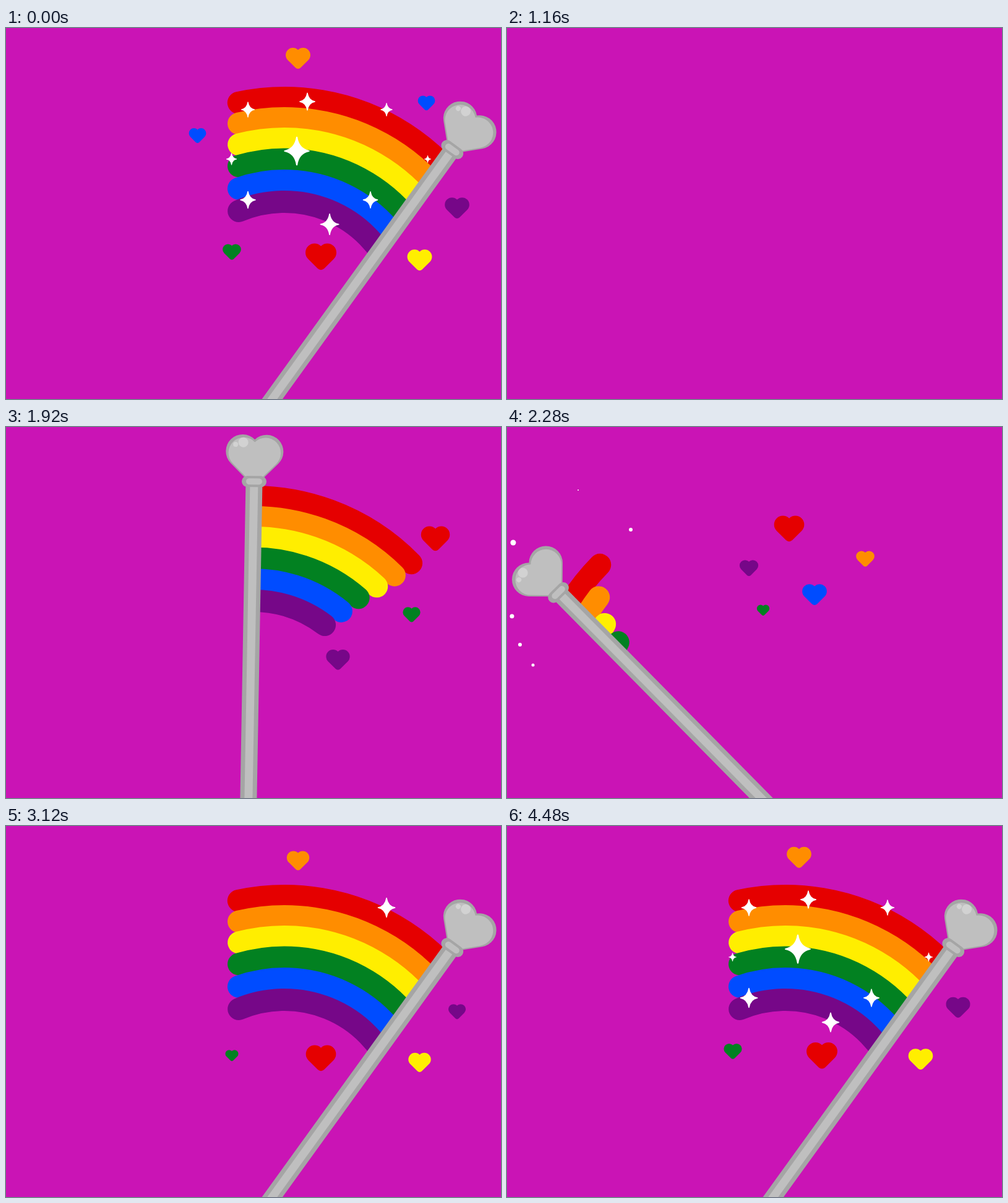
Recreate the animation shown at these times as an HTML page with a canvas. Size 800 by 600 pixels, loop 4520 ms.

```html
<!DOCTYPE html>
<html lang="en">
<head>
<meta charset="utf-8">
<title>Rainbow wand</title>
<style>
html, body { margin: 0; width: 100%; height: 100%; overflow: hidden; background: #ca14b5; }
canvas { display: block; width: 800px; height: 600px; }
</style>
</head>
<body>
<canvas id="stage" width="800" height="600"></canvas>
<script>
const ctx = document.getElementById('stage').getContext('2d');
const LOOP = 4520, STEP = 40, TAU = Math.PI * 2, RAD = Math.PI / 180;
const BG = '#ca14b5', DARK = '#a5a5a5', LIGHT = '#bfbfbf', SHINE = '#d2d2d2';
const RED = '#e50000', ORANGE = '#ff8d00', YELLOW = '#ffee00',
      GREEN = '#028121', BLUE = '#004cff', PURPLE = '#760788';

// colour, radius, right end, tail angle at the left turn, resting left end
const BANDS = [
  [RED, 357, 45.6, -45.5, -12],
  [ORANGE, 324, 44.7, -52.4, -13.2],
  [YELLOW, 291, 43.2, -58, -14.7],
  [GREEN, 257.5, 41.2, -61, -16.7],
  [BLUE, 223, 39.5, -72, -19.4],
  [PURPLE, 189, 37.5, -78, -23]
];

// colour, x, resting y, width, birth, life
const BURST_HEARTS = [
  [RED, 509, 365, 50, 3000],
  [ORANGE, 472, 42.7, 40, 3040],
  [YELLOW, 668.5, 369, 40, 3040],
  [GREEN, 365, 354, 30, 3080],
  [PURPLE, 729, 283, 40, 3080],
  [BLUE, 679.5, 104, 40, 3201],
  [BLUE, 309.5, 155, 54, 3216, 620]
];
const SIDE_HEARTS = [
  [GREEN, 259, 250, 31, 3840],
  [PURPLE, 478.5, 337, 38, 3880],
  [ORANGE, 287, 173, 40, 3920]
];
const later = (list, ms) => list.map(([c, x, y, w, born, life]) => [c, x, y, w, born + ms, life]);
const HEARTS = [
  [RED, 694, 167, 51, 1840],
  [GREEN, 655.5, 290, 31, 1840],
  [PURPLE, 536.5, 363, 42, 1840],
  [BLUE, 497, 263, 40, 2120],
  [ORANGE, 579, 205, 30, 2120],
  [RED, 456, 154, 50, 2160],
  [PURPLE, 391, 211, 43, 2240],
  [GREEN, 414, 279, 29, 2240],
  ...later(SIDE_HEARTS, -1280), ...SIDE_HEARTS,
  ...BURST_HEARTS, ...later(BURST_HEARTS, 1280)
];

// x, y, full height, pulse length, phase at the loop point, first appearance
const STARS = [
  [391, 132, 28, 660, .67],
  [487, 119, 28, 660, .55, 4150],
  [615, 132, 43, 1280, .838, 2960],
  [681.5, 212, 27, 1280, .853],
  [364.5, 212, 32, 660, .2],
  [470, 199, 45, 660, .55],
  [391, 278, 35, 660, .715],
  [589, 278, 28.5, 660, .62],
  [523, 317.5, 35, 660, .4]
];

// offset from the burst centre, radius
const DOTS = [
  [-40, -53, 4.5], [-42, 66, 3.5], [-29, 112, 3],
  [-8, 145, 2.5], [65, -138, 1], [150, -74, 3]
];

const part = (t, a, b) => Math.min(1, Math.max(0, (t - a) / (b - a)));
const mix = (a, b, k) => a + (b - a) * k;
const quad = u => u < .5 ? 2 * u * u : 1 - 2 * (1 - u) ** 2;
const cubic = u => u < .5 ? 4 * u ** 3 : 1 - 4 * (1 - u) ** 3;

function disc(x, y, r, fill) {
  ctx.beginPath();
  ctx.arc(x, y, r, 0, TAU);
  ctx.fillStyle = fill;
  ctx.fill();
}

function heartPath(side, round) {
  const h = side / 2;
  ctx.beginPath();
  ctx.moveTo(-h, -h);
  ctx.arc(0, -h, h, Math.PI, 0);
  ctx.arcTo(h, h, -h, h, round);
  ctx.lineTo(-h, h);
  ctx.arc(-h, 0, h, Math.PI / 2, Math.PI * 1.5);
  ctx.closePath();
}

function heart(x, y, w, fill) {
  const side = w / 1.707;
  ctx.save();
  ctx.translate(x, y + side * .125);
  ctx.rotate(Math.PI / 4);
  heartPath(side, side * .25);
  ctx.fillStyle = fill;
  ctx.fill();
  ctx.restore();
}

function star(x, y, size) {
  if (size < .5) return;
  const v = size / 2, h = v * .88, c = v * .14;
  ctx.beginPath();
  ctx.moveTo(x, y - v);
  ctx.quadraticCurveTo(x + c, y - c, x + h, y);
  ctx.quadraticCurveTo(x + c, y + c, x, y + v);
  ctx.quadraticCurveTo(x - c, y + c, x - h, y);
  ctx.quadraticCurveTo(x - c, y - c, x, y - v);
  ctx.closePath();
  ctx.lineJoin = 'round';
  ctx.lineWidth = size * .05;
  ctx.fillStyle = ctx.strokeStyle = '#fff';
  ctx.fill();
  ctx.stroke();
}

function pill(x, y, w, h, r, fill) {
  ctx.beginPath();
  ctx.roundRect(x, y, w, h, r);
  ctx.fillStyle = fill;
  ctx.fill();
}

// Wand angle, collar position and rainbow centre
function poseAt(t) {
  let a, px, cx = 400, cy = 470, slide = 0;
  if (t < 2300) {
    a = mix(44, -44.6, cubic(part(t, 1722, 2122)));
    px = 392 + Math.max(0, a) / 4;
    const k = Math.max(0, -a / 44.6);
    cx += 5 * k;
    cy += 3 * k;
    slide = 560 * (1 - part(t, 1200, 1640)) ** 3;
  } else {
    const q = cubic(part(t, 2300, 2760));
    a = mix(-44.6, 35.8, q);
    px = mix(392, 444, q);
    cx = mix(405, 450, q);
    cy = mix(473, 470, q);
  }
  const len = 493 - (t >= 2300 && a > 0 ? 19 * (a / 35.8) ** 2 : 54 * (a / 45) ** 2) - slide;
  return { a, x: px + len * Math.sin(a * RAD), y: 581 - len * Math.cos(a * RAD), cx, cy };
}

function toWand(p) {
  ctx.translate(p.x, p.y);
  ctx.rotate(p.a * RAD);
}

function rainbow(p, side, ends) {
  ctx.save();
  ctx.save();
  toWand(p);
  ctx.beginPath();
  ctx.rect(side > 0 ? 0 : -1500, -1000, 1500, 2500);
  ctx.restore();
  ctx.clip();
  ctx.lineCap = 'round';
  ctx.lineWidth = 36;
  BANDS.forEach(([color, r], i) => {
    const tail = (ends(BANDS[i]) - 90) * RAD, far = (-90 - side * 95) * RAD;
    ctx.beginPath();
    ctx.arc(p.cx, p.cy, r, Math.min(tail, far), Math.max(tail, far));
    ctx.strokeStyle = color;
    ctx.stroke();
  });
  ctx.restore();
}

function wand(p) {
  ctx.save();
  toWand(p);
  ctx.fillStyle = DARK;
  ctx.fillRect(-13.5, 0, 27, 900);
  ctx.fillStyle = LIGHT;
  ctx.fillRect(-6.5, 0, 13, 900);
  ctx.save();
  ctx.translate(0, -29.3);
  ctx.rotate(Math.PI / 4);
  heartPath(54.5, 8);
  ctx.fillStyle = DARK;
  ctx.fill();
  ctx.clip();
  ctx.translate(.4, .4);
  heartPath(49.5, 6);
  ctx.fillStyle = LIGHT;
  ctx.fill();
  ctx.restore();
  disc(-18.5, -63, 8, SHINE);
  disc(-31, -59.5, 4, SHINE);
  pill(-20, -9, 40, 18, 9, DARK);
  pill(-13, -5, 26, 10, 5, LIGHT);
  ctx.restore();
}

function burst(t, x, y, start, flip) {
  const u = (t - start) / 300;
  if (u <= 0 || u >= 1) return;
  const reach = (1 - (1 - u) ** 2) / .64;
  for (const [dx, dy, r] of DOTS) {
    disc(x + flip * dx * reach, y + dy * reach, r * (1 - u) / .6, '#fff');
  }
}

function drawHearts(t) {
  for (const [color, x, y, w, born, life = 440] of HEARTS) {
    const age = t - born;
    if (age <= 0 || age >= life) continue;
    const grow = (1 - Math.exp(-age / 33)) * Math.min(1, (life - age) / 120);
    heart(x, y + 22 * Math.exp(-age / 160), w * grow, color);
  }
}

function drawStars(t) {
  for (const [x, y, size, period, phase, first] of STARS) {
    const zero = LOOP - phase * period;
    const from = first || zero - Math.floor((zero - 3140) / period) * period;
    const to = zero + Math.floor((LOOP + 970 - zero) / period) * period;
    if (t < from || t >= to) continue;
    const pulse = Math.abs(Math.sin(Math.PI * (t - zero) / period));
    star(x, y, size * pulse * Math.min(1, (t - from) / 80));
  }
}

function draw(time) {
  // The opening continues the closing pose
  const t = time < 1160 ? time + LOOP : time;
  ctx.fillStyle = BG;
  ctx.fillRect(0, 0, 800, 600);
  if (t < 1240) return;
  const p = poseAt(t);
  if (t > 1740 && t < 2420) {
    const k = quad(part(t, 1920, 2420));
    rainbow(p, 1, b => b[2] - (b[2] - b[3]) / .843 * k);
  }
  if (t > 2300) {
    const k = quad(part(t, 2460, 2840));
    rainbow(p, -1, b => mix(-b[2], b[4], k));
  }
  drawHearts(t);
  wand(p);
  drawStars(t);
  burst(t, 50, 240, 2160, 1);
  burst(t, 745, 160, 2800, -1);
}

const begin = performance.now();
function tick() {
  const time = (performance.now() - begin) % LOOP;
  draw(Math.floor(time / STEP) * STEP);
  requestAnimationFrame(tick);
}
tick();
</script>
</body>
</html>
```
